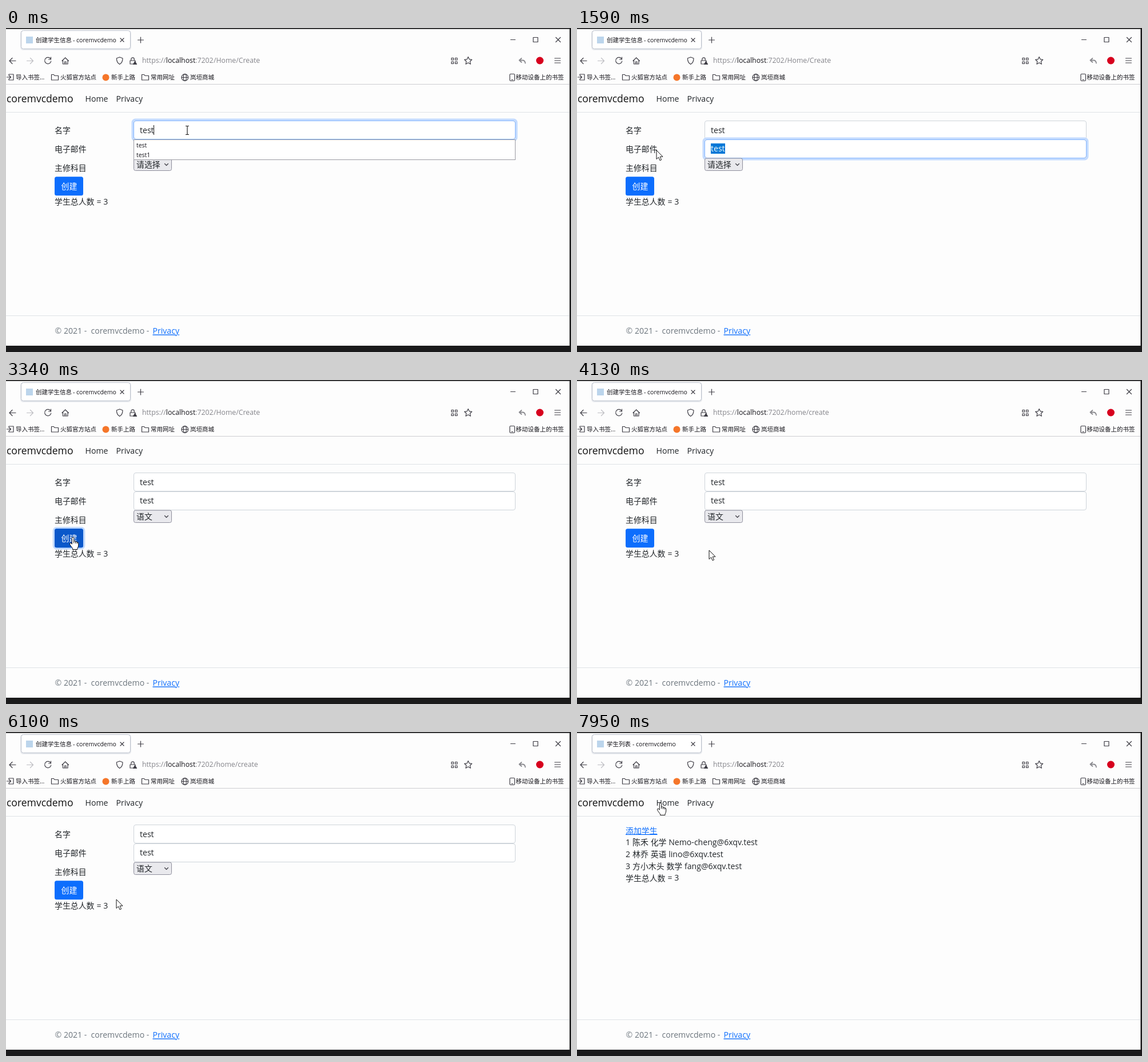
Animation, 988 px wide and 567 px high, one loop 8 s. Source, as an HTML page:

```html
<!DOCTYPE html>
<html lang="zh-CN">
<head>
<meta charset="utf-8">
<title>创建学生信息</title>
<style>
  html, body { margin: 0; width: 100%; height: 100%; overflow: hidden; background: #fdfdfd; }
  svg { display: block; width: 988px; height: 567px; }
  text {
    font: 14.1px "Open Sans", "Noto Sans CJK SC", "Noto Sans CJK", sans-serif;
    fill: #212529; white-space: pre;
  }
  .zh { font-size: 13.9px; }
  .brand { font-size: 17.55px; fill: #111; }
  .ui { font-size: 10.5px; fill: #15141a; }
  .url { font-size: 12.27px; fill: #85858b; }
  .url tspan { fill: #15141a; }
  .muted { fill: #6c757d; }
  .link { fill: #0d6efd; text-decoration: underline; }
  .white, .white text { fill: #fff; }
  .icon { fill: none; stroke: #3e3d45; stroke-width: 1.2; stroke-linejoin: round; stroke-linecap: round; }
  .pale { stroke: #bdbdc2; }
  .rule { stroke: #dee2e6; }
  .field { fill: #fff; stroke: #ced4da; }
  .ring { fill: none; stroke: #c3dbff; stroke-width: 3.6; }
  .edge { fill: none; stroke: #86b7fe; }
  .popup { fill: #fff; stroke: #9a9aa2; }
  .mark { fill: #0078d7; }
  .pointer path { fill: #fff; stroke: #111; stroke-width: 1; stroke-linejoin: round; }
  .pointer #beam { fill: none; stroke: #222; stroke-width: 1.2; }
</style>
</head>
<body>
<svg viewBox="0 0 988 567">
  <rect width="988" height="567" fill="#fdfdfd"/>

  <!-- tab strip -->
  <rect x="25" y="4" width="194" height="35" rx="5" fill="#e9ebef"/>
  <rect x="26.5" y="4.5" width="191" height="32" rx="4" fill="#fff" stroke="#b9bfca"/>
  <rect data-on="0-3460 3740-4760 5120-6640 6880-8000" x="35" y="15" width="12" height="12" fill="#bcd5ec"/>
  <circle id="dot" data-on="3460-3740 4760-5120 6640-6880" cx="37" cy="21" r="1.7" fill="#333"/>
  <g class="ui">
    <g data-on="0-6760">
      <text class="ui" x="52" y="25">创建学生信息</text>
      <text class="ui" x="117" y="25">- coremvcdemo</text>
    </g>
    <g data-on="6760-8000">
      <text class="ui" x="52" y="25">学生列表</text>
      <text class="ui" x="97" y="25">- coremvcdemo</text>
    </g>
  </g>
  <path class="icon" d="M200 18l6 6m0-6l-6 6M230.500 21h10m-5-5v10M882.500 20.500h8M922 16.500h8v8h-8zM961.500 16.500l8 8m0-8l-8 8"/>

  <!-- toolbar -->
  <g class="icon">
    <path d="M17 57.500H6m5-5l-5 5 5 5"/>
    <path class="pale" d="M36.500 57.500h11m-5-5l5 5-5 5"/>
    <path id="reload" data-on="0-3460 3740-4760 5120-6640 6880-8000" d="M78 54a5.600 5.600 0 1 0 .8 4M78.500 51v4h-4"/>
    <path data-on="3460-3740 4760-5000 6640-6880" d="M68.500 53l9 9m0-9l-9 9"/>
    <path data-on="5000-5120" d="M68 54a5.600 5.600 0 1 1-.8 4M67.500 62v-4h4"/>
    <path d="M98 57.500l5.700-5.500 5.700 5.500M99.500 56.500v6.500h8.500v-6.500M102.500 63v-4h2.500v4"/>
    <path d="M198.700 51l5.300 2c0 5-1.500 8.500-5.300 10.500-3.800-2-5.300-5.500-5.300-10.500z"/>
    <path d="M217 57h9v6h-9zM218.800 57v-2.500a2.700 2.700 0 0 1 5.400 0V57"/>
    <path fill="#3e3d45" d="M225.500 58.500l3 5h-6z"/>
    <path d="M779 52.500h3.500v3.500H779zM785.500 52.500h3.500v3.500h-3.500zM779 59h3.500v3.500H779zM785.500 59h3.500v3.500h-3.500z"/>
    <path d="M808.200 50.500l2 4.300 4.600.5-3.400 3.200 1 4.700-4.200-2.400-4.200 2.400 1-4.700-3.400-3.200 4.600-.5z"/>
    <path stroke="#8a8a8f" stroke-width="1.8" d="M901.500 53l-4 3.500 4 3.500M898 56.500h5q4.500 0 5 5"/>
    <path d="M959.500 53h10m-10 4h10m-10 4h10"/>
  </g>
  <circle cx="933.500" cy="57" r="6.500" fill="#d7001e"/>
  <text class="url" x="238" y="61.200">https://<tspan>localhost</tspan>:7202</text>
  <text class="url" data-on="0-3590" x="363" y="61.200">/Home/Create</text>
  <text class="url" data-on="3590-6760" x="363" y="61.200">/home/create</text>

  <!-- bookmarks -->
  <g class="icon">
    <path d="M5 83v-2h8v10H5v-2M1.500 86h7m-2.500-2.500l2.500 2.500L6 88.500"/>
    <path id="folder" d="M79.500 81.500h4l1.500 2h6.500v7.500h-12z"/>
    <path d="M237.500 81.500h4l1.500 2h6.500v7.500h-12z"/>
    <circle cx="312.800" cy="86.500" r="5.800"/>
    <ellipse cx="312.800" cy="86.500" rx="2.500" ry="5.800"/>
    <path d="M307 86.500h11.600"/>
    <rect x="881" y="80.500" width="8.500" height="12" rx="1.500"/>
    <path d="M884 90.500h2.500"/>
  </g>
  <circle cx="174.500" cy="86.500" r="6" fill="#f5762a"/>
  <text class="ui" x="17" y="90.400">导入书签...</text>
  <text class="ui" x="95" y="90.400">火狐官方站点</text>
  <text class="ui" x="184" y="90.400">新手上路</text>
  <text class="ui" x="253" y="90.400">常用网址</text>
  <text class="ui" x="322" y="90.400">岚垣商城</text>
  <text class="ui" x="891.500" y="90.400">移动设备上的书签</text>
  <path stroke="#cdcdd2" d="M0 98.500h985"/>

  <!-- page header and footer -->
  <text class="brand" x="1" y="129.700">coremvcdemo</text>
  <text x="138.500" y="128.500">Home</text>
  <text x="192.500" y="128.500">Privacy</text>
  <path class="rule" d="M0 147.500h985M0 503.500h985"/>
  <text class="muted" x="85.500" y="535.300">© 2021 -</text>
  <text class="muted" x="148.500" y="535.300">coremvcdemo -</text>
  <text class="link" x="256.500" y="535.300">Privacy</text>

  <!-- form -->
  <g data-on="0-6760">
    <text class="zh" x="85" y="184">名字</text>
    <text class="zh" x="85" y="217">电子邮件</text>
    <text class="zh" x="85" y="249.500">主修科目</text>

    <rect class="field" x="223.500" y="162.500" width="667" height="32" rx="3.500"/>
    <rect class="field" x="223.500" y="195.500" width="667" height="32" rx="3.500"/>
    <g data-on="0-240 510-770">
      <rect class="ring" x="221.300" y="160.300" width="671.400" height="36.400" rx="5"/>
      <rect class="edge" x="223.500" y="162.500" width="667" height="32" rx="3.500"/>
      <path stroke="#111" d="M258.500 170v17"/>
    </g>
    <g data-on="770-2010">
      <rect class="ring" x="221.300" y="193.300" width="671.400" height="36.400" rx="5"/>
      <rect class="edge" x="223.500" y="195.500" width="667" height="32" rx="3.500"/>
    </g>
    <text x="234" y="183.500">test</text>
    <text x="234" y="216.300">test</text>
    <g data-on="1190-2010">
      <rect class="mark" x="234" y="202" width="25" height="18"/>
      <text class="white" x="234" y="216.300">test</text>
    </g>

    <rect x="223.500" y="228" width="66" height="21.500" rx="3" fill="#e9e9ed" stroke="#8f8f9d"/>
    <text class="zh" data-on="0-2800" x="228" y="244.300">请选择</text>
    <text class="zh" data-on="2800-8000" x="228" y="244.300">语文</text>
    <path class="icon" stroke-width="1.500" d="M277.500 237.500l3 3 3-3"/>

    <g data-on="0-240">
      <rect class="popup" x="223.500" y="195.500" width="667" height="35"/>
      <text class="ui" x="228" y="208.800">test</text>
      <text class="ui" x="228" y="226.300">test1</text>
    </g>
    <g data-on="770-1590">
      <rect class="popup" x="223.500" y="228.500" width="667" height="35"/>
      <text class="ui" x="228" y="241.800">test</text>
      <text class="ui" x="228" y="259.300">test1</text>
    </g>

    <rect class="ring" data-on="3340-3590 4760-5000" x="83.500" y="258.700" width="53" height="36" rx="5"/>
    <rect x="85" y="260.300" width="50" height="33" rx="3.500" fill="#0d6efd"/>
    <rect data-on="3040-3590 4640-5000" x="85" y="260.300" width="50" height="33" rx="3.500" fill="#0a58ca"/>
    <text class="zh white" x="96.500" y="282">创建</text>
    <text class="zh" x="85" y="309">学生总人数</text>
    <text x="158.500" y="308.800">= 3</text>

    <g id="options" data-on="2130-2800">
      <rect class="popup" x="223.500" y="250.500" width="66" height="142"/>
      <rect class="mark" data-on="2130-2370" x="224" y="251" width="65" height="20"/>
      <rect class="mark" data-on="2370-2800" x="224" y="271" width="65" height="20"/>
    </g>
  </g>

  <!-- student list -->
  <g data-on="6760-8000">
    <text class="zh link" x="85" y="177.700">添加学生</text>
    <g id="students"></g>
    <g data-on="7570-7950" class="white">
      <rect class="mark" x="85" y="226" width="230" height="19"/>
      <rect class="mark" x="85" y="246" width="96" height="19"/>
      <g id="selected"></g>
    </g>
  </g>

  <!-- loading status -->
  <g data-on="4760-5120">
    <path fill="#fcfcfc" stroke="#e0e0e4" d="M-1 539.500h218v17H-1z"/>
    <text x="-4.600" y="551.500" class="ui">localhost</text>
  </g>

  <!-- desktop around the window -->
  <path fill="#1a1a1b" d="M0 0h988v567H0v-11h985.500V1.800H0z"/>

  <g id="pointer" class="pointer">
    <path id="arrow" d="M0 0V15.500L3.600 12.200 6 17.800 8.600 16.700 6.200 11.200H11z"/>
    <path id="beam" d="M-3-7.500h2q1 0 1 1 0-1 1-1h2M0-6.500v13M-3 7.500h2q1 0 1-1 0 1 1 1h2"/>
    <path id="hand" d="M-1.700 1.500Q-1.700 0 0 0T1.700 1.500V7Q4 6 4.600 7.800 7 7 7.300 9 9.700 8.500 9.700 11v3q0 3-1.700 5.200V21.500H-.500V19.500Q-4 15.500-5.500 12.300-5.500 9-3 10.700l1.300 1.500zM1.700 7v3.500M4.600 8v3M7.300 9v2.500"/>
  </g>
</svg>
<script>
const LOOP = 8000;
const $ = id => document.getElementById(id);

function addText(parent, x, y, string, className = '') {
  const node = document.createElementNS('http://www.w3.org/2000/svg', 'text');
  node.setAttribute('x', x);
  node.setAttribute('y', y);
  node.setAttribute('class', className);
  node.textContent = string;
  parent.append(node);
}

const students = [
  ['陈禾', '化学', 'Nemo-cheng@6xqv.test'],
  ['林乔', '英语', 'lino@6xqv.test'],
  ['方小木头', '数学', 'fang@6xqv.test']
];

function addStudent(parent, index) {
  const [name, major, mail] = students[index];
  const y = 198.300 + index * 20.700;
  const majorX = 97 + name.length * 13.850 + 4;
  addText(parent, 85, y, index + 1);
  addText(parent, 97, y, name, 'zh');
  addText(parent, majorX, y, major, 'zh');
  addText(parent, majorX + 31.500, y, mail);
}

function addTotal(parent) {
  addText(parent, 85, 260.500, '学生总人数', 'zh');
  addText(parent, 158.500, 260.300, '= 3');
}

students.forEach((_, i) => addStudent($('students'), i));
addTotal($('students'));
addStudent($('selected'), 2);
addTotal($('selected'));

['请选择', '语文', '数学', '英语', '化学', '物理', '生物'].forEach((label, i) =>
  addText($('options'), 228, 266 + i * 20, label, 'zh'));

// time, shape, hot spot; the pointer jumps from place to place
const moves = `
  0 beam 317 179, 120 beam 240 181, 240 arrow 112 190, 360 arrow 150 197,
  510 arrow 146 202, 630 beam 236 208, 770 beam 250 211, 1040 none 250 211,
  1190 beam 270 211, 1320 arrow 112 206, 1460 arrow 101 208, 1590 arrow 139 214,
  1710 arrow 231 236, 1860 arrow 227 234, 2250 arrow 236 252, 2370 arrow 240 270,
  2490 arrow 243 277, 2920 arrow 190 262, 3040 arrow 120 273, 3190 hand 117 275,
  3590 arrow 130 294, 3740 arrow 182 297, 3860 arrow 122 296, 4010 arrow 180 298,
  4130 arrow 231 298, 4400 arrow 200 295, 4520 arrow 150 290, 4640 hand 118 281,
  5400 arrow 170 297, 5520 arrow 197 298, 5950 none 197 298, 6100 arrow 193 293,
  6220 arrow 165 210, 6340 arrow 143 137, 6490 hand 148 127, 6880 arrow 162 205,
  7030 beam 169 254, 7150 beam 160 251, 7300 beam 125 247, 7420 beam 94 240,
  7570 arrow 160 264, 7950 hand 146 124`
  .split(',').map(move => {
    const [at, shape, x, y] = move.trim().split(' ');
    return { at: +at, shape, x, y };
  });

const timed = [...document.querySelectorAll('[data-on]')].map(node => ({
  node,
  spans: node.dataset.on.split(' ').map(span => span.split('-').map(Number))
}));

function draw(t) {
  for (const { node, spans } of timed) {
    const on = spans.some(([from, to]) => t >= from && t < to);
    node.style.display = on ? '' : 'none';
  }
  const { shape, x, y } = moves.findLast(move => move.at <= t);
  $('pointer').setAttribute('transform', `translate(${x} ${y})`);
  for (const id of ['arrow', 'beam', 'hand']) {
    $(id).style.display = id === shape ? '' : 'none';
  }
}

const start = performance.now();
function tick() {
  draw((performance.now() - start) % LOOP);
  requestAnimationFrame(tick);
}
tick();
</script>
</body>
</html>
```
